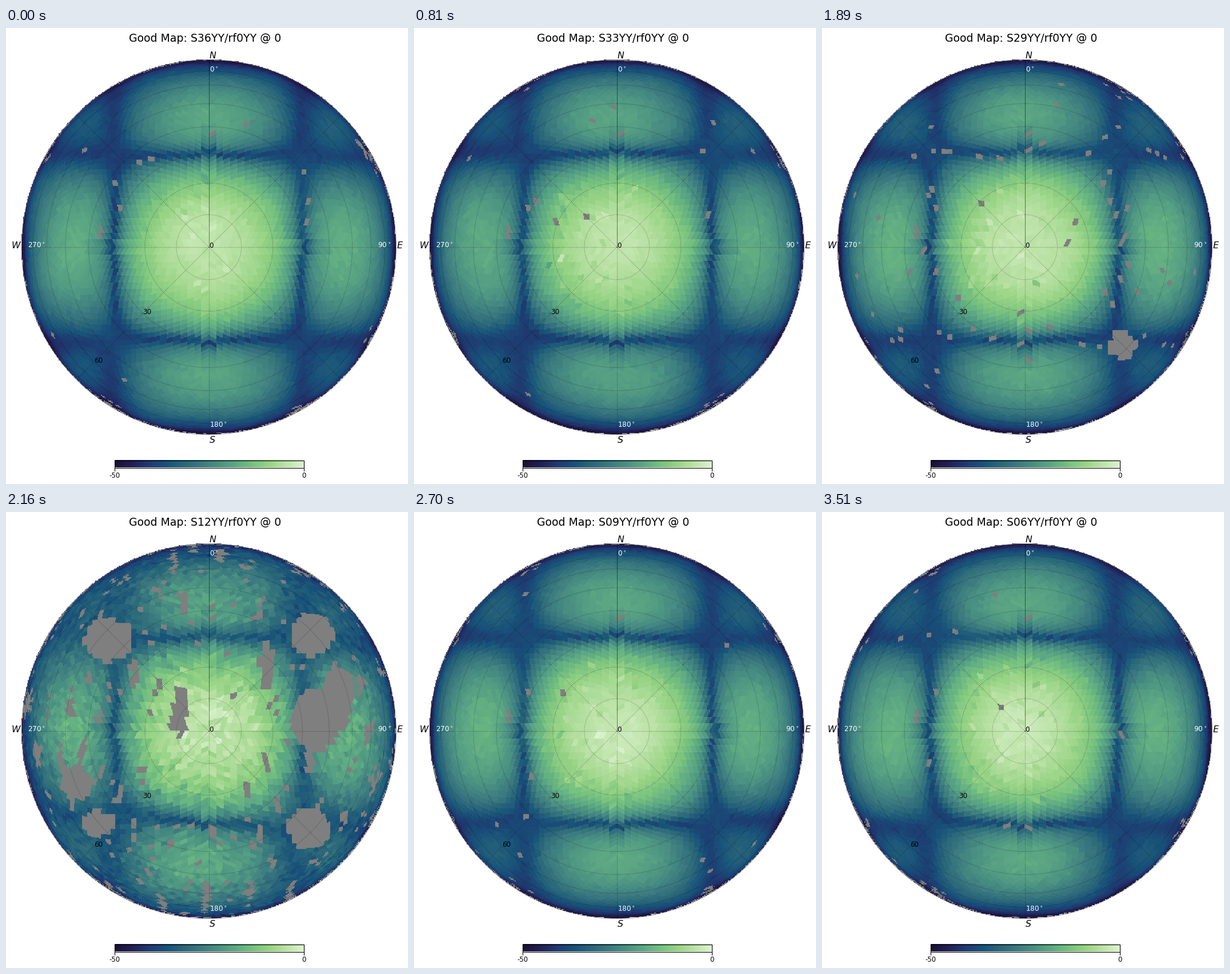
Write a matplotlib script that moves like this. It is 703x797 px and loops after 3780 ms.

```python
import numpy as np
import matplotlib.pyplot as plt
from matplotlib.animation import FuncAnimation
from matplotlib.colors import LinearSegmentedColormap
from matplotlib.patches import Circle, Rectangle

W, H, DPI = 703, 797, 100
CX, CY, R = 354.8, 383, 327.5
NSIDE, GRID = 32, 400
INTERVAL = 270

TILES = [*range(36, 28, -1), 12, *range(10, 5, -1)]
SPARSE, WORN = 12, 29  # tiles with poor sky coverage

# Cells no satellite pass ever covers, in stage pixels.
ALWAYS_MISSING = [(361, 182), (204, 314), (166, 352), (167, 363)]

# Larger coverage holes: centre x, y and half-sizes.
HOLES = {
    WORN: [(526, 555, 24, 24)],
    SPARSE: [(178, 225, 42, 38), (543, 365, 46, 54), (583, 310, 28, 38),
             (535, 215, 38, 38), (530, 553, 37, 37), (125, 475, 28, 30),
             (160, 545, 28, 22), (305, 350, 12, 50), (457, 270, 14, 42)],
}

JADE = LinearSegmentedColormap.from_list("jade", [
    "#1a1133", "#211f56", "#1f3a70", "#18527a", "#296679", "#3a797f",
    "#4a8f82", "#5ca784", "#75c07f", "#97d385", "#bbe2a6", "#dcf3cf"])
GREY = (0.5, 0.5, 0.5, 1)


def sky_pixels(u, v):
    """Ring-ordered equal-area pixel number for points seen from the zenith."""
    z = np.sqrt(np.clip(1 - u**2 - v**2, 0, 1))
    turn = np.mod(np.arctan2(u, v), 2 * np.pi) / (np.pi / 2)

    a, b = NSIDE * (0.5 + turn), NSIDE * 0.75 * z
    jp, jm = np.floor(a - b).astype(int), np.floor(a + b).astype(int)
    ring = NSIDE + 1 + jp - jm
    step = ((jp + jm - NSIDE + 2 - (ring & 1)) // 2) % (4 * NSIDE)
    belt = 2 * NSIDE * (NSIDE - 1) + (ring - 1) * 4 * NSIDE + step

    frac, scale = turn % 1, NSIDE * np.sqrt(3 * (1 - z))
    ring = (frac * scale).astype(int) + ((1 - frac) * scale).astype(int) + 1
    cap = 2 * ring * (ring - 1) + (turn * ring).astype(int)
    return np.where(z > 2 / 3, cap, belt)


axis = (np.arange(GRID) + 0.5) / GRID * 2 - 1
U, V = np.meshgrid(axis, -axis)
inside = U**2 + V**2 < 1
_, cell = np.unique(sky_pixels(U[inside], V[inside]), return_inverse=True)
cell = cell.ravel()
area = np.bincount(cell)
cu = np.bincount(cell, U[inside]) / area
cv = np.bincount(cell, V[inside]) / area
radius = np.hypot(cu, cv)
null_distance = np.minimum(np.abs(np.abs(cu) - 0.49), np.abs(np.abs(cv) - 0.5))
cell_map = np.full((GRID, GRID), -1)
cell_map[inside] = cell


def cell_at(x, y):
    col = int((x - CX + R) / (2 * R) * GRID)
    row = int((y - CY + R) / (2 * R) * GRID)
    return cell_map[row, col]


def ripple(rng, freq_u, freq_v, waves=12):
    """Smooth random field with unit variance."""
    total = 0
    for angle, phase in rng.uniform(0, 2 * np.pi, (waves, 2)):
        total = total + np.cos(freq_u * cu * np.cos(angle)
                               + freq_v * cv * np.sin(angle) + phase)
    return total * np.sqrt(2 / waves)


def beam_db(rng, sparse):
    """4 x 4 dipole tile over a ground plane with small gain errors."""
    # Cells along the four face seams of the cap read closer to the zenith.
    seam = np.exp(-(np.minimum(np.abs(cu), np.abs(cv)) / 0.04)**2)
    pull = 1 - 0.05 * seam * (radius < 0.66)
    u, v = cu * pull, cv * pull

    sigma = 0.06 if sparse else 0.038
    field = 0
    for i in range(4):
        for j in range(4):
            gain = 1 + sigma * (rng.normal() + 1j * rng.normal())
            phase = 3.16 * ((i - 1.5) * u + (j - 1.5) * v)
            field = field + gain * np.exp(1j * phase) / 16
    height = 2 * np.pi * 0.137
    z = np.sqrt(np.clip(1 - radius**2, 1e-6, 1))
    element = (np.sin(height * z) / np.sin(height))**2 * (1 - cv**2)
    floor = (6e-4 if sparse else 2.2e-4) * (1 - radius**24)
    return 10 * np.log10(np.abs(field)**2 * element**0.7 + floor + 1e-6)


def missing_cells(rng, tile):
    size = len(cu)
    chance = 0.3 * np.exp(-(null_distance / 0.06)**2) * (radius > 0.968)
    chance += 0.4 * (radius > 0.994)
    gone = rng.random(size) < chance * (ripple(rng, 9, 9) > -0.2)

    # Stray gaps favour the weak signal along the nulls.
    weight = area * (0.12 + np.exp(-(null_distance / 0.06)**2))
    strays = 70 if tile == WORN else 11
    gone[rng.choice(size, strays, replace=False, p=weight / weight.sum())] = True

    if tile == SPARSE:
        streaks = ripple(rng, 60, 25) + 0.5 * rng.normal(size=size)
        gone |= streaks + 0.7 * radius > 2.1
    for x, y, rx, ry in HOLES.get(tile, []):
        gone |= ((cu * R + CX - x) / rx)**2 + ((CY - cv * R - y) / ry)**2 < 1
    for x, y in ALWAYS_MISSING:
        gone[cell_at(x, y)] = True
    return gone


def sky_image(n):
    tile = TILES[n]
    sparse = tile == SPARSE
    rng = np.random.default_rng(500 + tile)
    db = beam_db(rng, sparse)
    db -= db[radius < 0.08].mean() + rng.uniform(3, 4)
    db += rng.normal(0, 1.5 if sparse else 0.45, len(db)) + 0.3 * ripple(rng, 14, 14)
    rough = (rng.random(len(db)) < 0.16) & (radius < 0.4) & (cu < 0.12)
    db += rough * rng.normal(0, 2, len(db))
    colours = JADE(np.clip((db + 50) / 50, 0, 1))
    colours[missing_cells(rng, tile)] = GREY
    image = np.ones((GRID, GRID, 4))
    image[..., 3] = 0
    image[inside] = colours[cell]
    return image


fig = plt.figure(figsize=(W / DPI, H / DPI), dpi=DPI, facecolor="white")
ax = fig.add_axes([0, 0, 1, 1])


def label(x, y, text, px=12, **style):
    style = {"ha": "left", "va": "baseline", **style}
    return ax.text(x, y, text, fontsize=px * 72 / DPI, family="DejaVu Sans", **style)


sky = ax.imshow(sky_image(0), extent=(CX - R, CX + R, CY + R, CY - R),
                interpolation="nearest", aspect="auto")
ax.add_patch(Circle((CX, CY), R, fill=False, ec="#808080", lw=0.6))

# Graticule: a ring every 10 degrees, a meridian every 45.
grid_style = dict(color="black", ls=":", lw=0.8, alpha=0.4)
t = np.linspace(0, 2 * np.pi, 361)
for deg in range(10, 90, 10):
    r = R * np.sin(np.radians(deg))
    ax.plot(CX + r * np.sin(t), CY - r * np.cos(t), **grid_style)
for deg in range(45, 360, 45):
    a = np.radians(deg)
    ax.plot([CX, CX + R * np.sin(a)], [CY, CY - R * np.cos(a)], **grid_style)
ax.plot([CX, CX], [CY - R, CY], color="black", lw=0.7, alpha=0.5)

for x, y, text in [(355.5, 77, "0"), (649.5, 384, "90"), (355.5, 698, "180"), (38, 384, "270")]:
    label(x, y, text + r"$^\circ$", color="white")
for deg in (0, 30, 60):
    offset = R * np.sin(np.radians(deg)) * np.sqrt(0.5)
    label(CX + 0.3 - offset, CY + 1 + offset, str(deg))
for x, y, text in [(361.5, 53, "N"), (361, 725, "S"), (688.5, 385, "E"), (17.5, 385, "W")]:
    label(x, y, text, 15.8, ha="center", style="italic")

# Colour bar.
left, right, top, bottom = 189.5, 520.5, 755.5, 768.5
ax.imshow(np.linspace(0, 1, 256)[None], cmap=JADE, extent=(left, right, bottom, top),
          aspect="auto")
ax.add_patch(Rectangle((left, top), right - left, bottom - top,
                       fill=False, ec="black", lw=0.8))
for x, text in [(left, "-50"), (right, "0")]:
    ax.plot([x, x], [bottom, bottom + 5], color="black", lw=0.8)
    label(x, 786.5, text, 11.8, ha="center")

title = label(348, 23.5, "", 18.9, ha="center")
ax.set_xlim(0, W)
ax.set_ylim(H, 0)
ax.axis("off")


def update(n):
    sky.set_data(sky_image(n))
    title.set_text(f"Good Map: S{TILES[n]:02d}YY/rf0YY @ 0")
    return sky, title


anim = FuncAnimation(fig, update, frames=len(TILES), interval=INTERVAL,
                     repeat=True, repeat_delay=0, blit=False)
plt.show()
```
